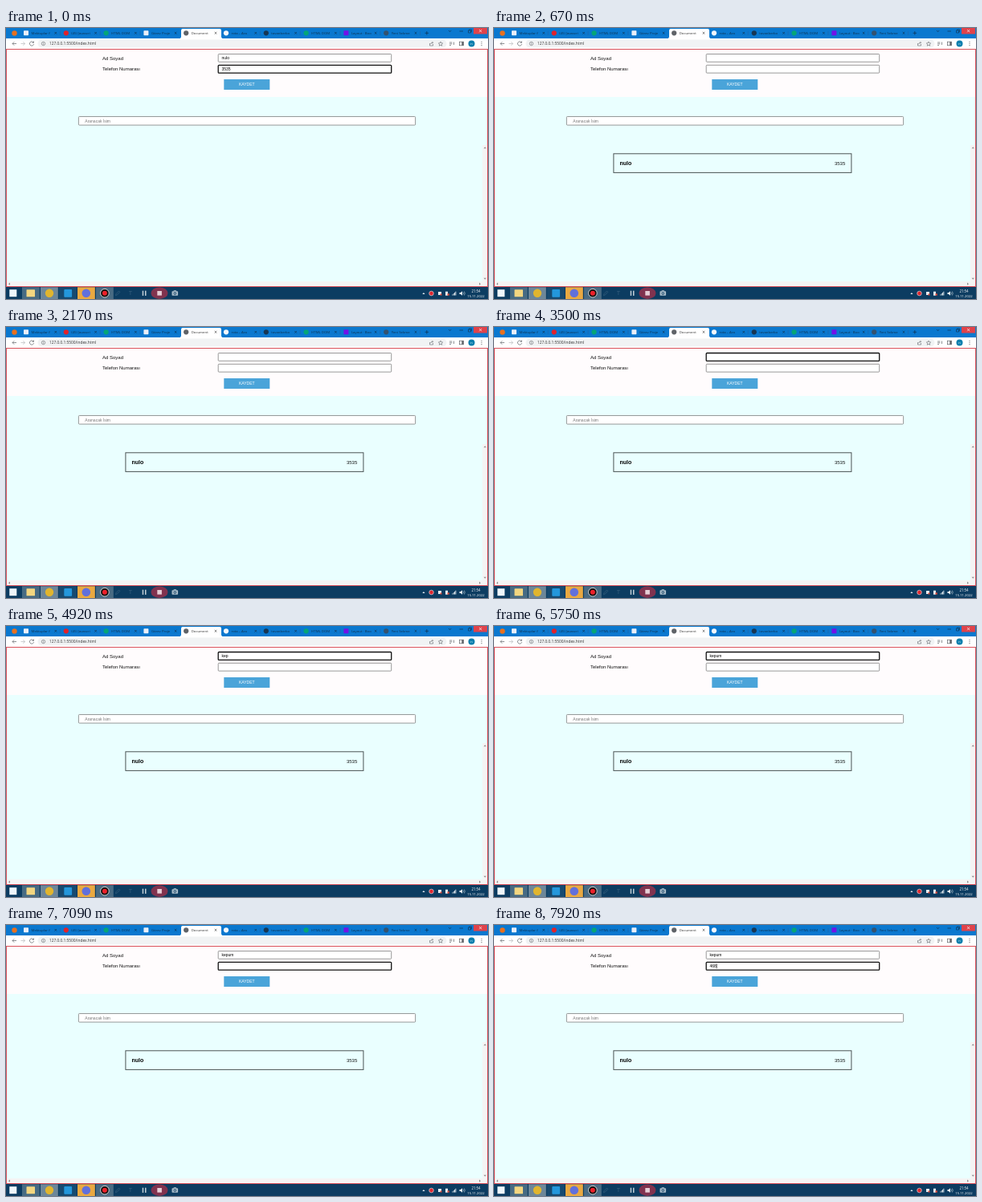
These frames come from a looping animation (600 by 338 pixels, 8000 ms). An HTML page:

```html
<!DOCTYPE html>
<html lang="tr">
<head>
<meta charset="utf-8">
<title>Rehber</title>
<style>
html, body { margin: 0; width: 100%; height: 100%; overflow: hidden; }
svg { display: block; width: 100vw; height: 100vh; }
text { font-family: "Liberation Sans", Arial, sans-serif; white-space: pre; }
.ui { font-family: "Open Sans", "Noto Sans", sans-serif; }
</style>
</head>
<body>
<svg id="stage" viewBox="0 0 600 338" preserveAspectRatio="none"></svg>
<script>
const NS = "http://www.w3.org/2000/svg";
const stage = document.getElementById("stage");
const LOOP = 8000;
const PERSON = "nulo", PHONE = "3535";
const NEXT_PERSON = "kepum", NEXT_PHONE = "468";

function add(tag, attrs, parent = stage) {
  const el = document.createElementNS(NS, tag);
  for (const key in attrs) el.setAttribute(key, attrs[key]);
  parent.appendChild(el);
  return el;
}
const rect = (x, y, width, height, fill, more) => add("rect", { x, y, width, height, fill, ...more });
const disc = (cx, cy, r, fill, more) => add("circle", { cx, cy, r, fill, ...more });
const line = (d, stroke, width = 0.7, more) =>
  add("path", { d, stroke, "stroke-width": width, fill: "none", ...more });
function label(x, y, str, size, fill, more) {
  const el = add("text", { x, y, "font-size": size, fill, ...more });
  el.textContent = str;
  return el;
}
const ui = (x, y, str, size, fill, more) => label(x, y, str, size, fill, { class: "ui", ...more });
const show = (el, on) => el.setAttribute("visibility", on ? "visible" : "hidden");

function drawTabs() {
  const ink = "#10324f";
  rect(0, 0, 600, 14, "#0a78cf");
  add("path", { d: "M215 13.5Q218 13 218 10.5V3Q218 1 220 1H266Q268 1 268 3V10.5Q268 13 271 13.5Z", fill: "#fff" });
  disc(10.5, 6.5, 3.2, "#e8711f");
  const tabs = [
    ["Mektuplar f", "#e9eef8", 0], ["(45) Javascri", "#e0222b", 1], ["HTML DOM", "#06a578", 1],
    ["Görev Proje", "#e9eef8", 0], ["Document", "#5f6368", 1], ["rota – Ara", "#f3f6fb", 1],
    ["tovanberko", "#173653", 1], ["HTML DOM", "#06a578", 1], ["Layout · Boo", "#7212e8", 0],
    ["Yeni Sekme", "#34526f", 1]
  ];
  tabs.forEach(([name, color, round], i) => {
    const x = 25 + i * 49.8;
    if (round) disc(x, 6.3, 3.1, color);
    else rect(x - 3, 3.3, 6, 6, color, { rx: 0.7 });
    ui(x + 6.5, 8, name, 4.3, i === 4 ? "#333" : ink);
    const c = x + 36.8;
    line(`M${c - 1.3} 5l2.6 2.6m0 -2.6l-2.6 2.6`, i === 4 ? "#444" : ink);
    if (i !== 3 && i !== 4) line(`M${c + 5.5} 4v5`, "#2760a0", 0.5);
  });
  line("M521.5 6.3h4.6M523.8 4v4.6", ink);
  line("M551 3l1.6 1.7l1.6 -1.7", ink);
  line("M564.5 4h4.5", ink);
  line("M575.5 3h3v3h-3zM576.5 3v-1h3v3h-1", ink, 0.6);
  rect(582, 0, 17, 7.5, "#e0434b");
  line("M589 2l3.2 3.2m0 -3.2l-3.2 3.2", "#fff");
}

function drawToolbar() {
  const ink = "#5f6368";
  rect(0, 13, 600, 13.5, "#fff");
  line("M13 19.5h-5m2.2 -2.2l-2.2 2.2l2.2 2.2", ink);
  line("M18.5 19.5h5m-2.2 -2.2l2.2 2.2l-2.2 2.2", "#b8babd");
  line("M34 17.8a2.6 2.6 0 1 0 0.6 2.3M34.5 16.5v1.9h-1.9", ink);
  rect(39.5, 14.5, 509, 10, "#f1f3f4", { rx: 5 });
  disc(46.5, 19.5, 2.2, "none", { stroke: ink, "stroke-width": 0.6 });
  line("M46.5 19.2v1.5M46.5 18v0.6", ink, 0.6);
  ui(54, 21.3, "127.0.0.1:5500/index.html", 4.8, "#333");
  line("M527.5 19v3h4v-2M528.5 20.2q0 -2 3 -2m-1.2 -1.3l1.3 1.3l-1.3 1.3", ink, 0.6);
  line("M541 17l.8 1.8l1.9 .2l-1.4 1.3l.4 1.9l-1.7 -1l-1.7 1l.4 -1.9l-1.4 -1.3l1.9 -.2z", ink, 0.6);
  line("M552 18h3.5M552 19.8h3.5M552 21.6h2M557.5 17.5v3.5", ink);
  rect(564.5, 17.2, 5, 4.6, "none", { stroke: ink, "stroke-width": 0.7 });
  rect(567.3, 17.2, 2.2, 4.6, ink);
  disc(579.5, 19.5, 4, "#0b7fae");
  ui(579.5, 21, "n", 4, "#fff", { "text-anchor": "middle" });
  [17.3, 19.5, 21.7].forEach(y => disc(592, y, 0.6, ink));
}

function drawPage() {
  rect(0, 26, 600, 60, "#fffcfd");
  rect(0, 86, 600, 237, "#eaffff");
  label(120, 39.5, "Ad Soyad", 6, "#111");
  label(120, 53.3, "Telefon Numarası", 6, "#111");
  rect(271.3, 64, 57, 13, "#4aa4d9");
  label(299.8, 72.3, "KAYDET", 5, "#fff", { "text-anchor": "middle" });
  rect(90.4, 110.5, 419.2, 10.6, "#fff", { rx: 0.9, stroke: "#777", "stroke-width": 0.75 });
  label(98.3, 117.6, "Aranacak İsim", 5, "#757575");

  rect(593, 146, 6, 170, "#f4f4f4");
  rect(1, 316, 598, 6, "#f4f4f4");
  const arrow = d => add("path", { d, fill: "#8c8c8c" });
  arrow("M594.6 150.2h3.2l-1.6 -2z");
  arrow("M594.6 311.8h3.2l-1.6 2z");
  arrow("M5 317.6v3.2l-2 -1.6z");
  arrow("M589 317.6v3.2l2 -1.6z");
}

function makeCard() {
  const card = add("g", {});
  card.append(
    rect(148.9, 156.8, 296, 23.6, "none", { stroke: "#4b5354", "stroke-width": 1 }),
    label(156.5, 171, PERSON, 7, "#000", { "font-weight": "bold" }),
    label(437.3, 170.6, PHONE, 6, "#111", { "text-anchor": "end" })
  );
  return card;
}

function makeField(y) {
  const box = rect(264.2, y, 215.5, 9.8, "#fff", { rx: 0.9 });
  const value = label(268.5, y + 6.7, "", 5, "#000");
  const caret = rect(268.5, y + 1.9, 0.6, 6, "#000");
  return (str, focused, caretOn) => {
    box.setAttribute("stroke", focused ? "#111" : "#777");
    box.setAttribute("stroke-width", focused ? 1.3 : 0.75);
    if (value.textContent !== str) value.textContent = str;
    caret.setAttribute("x", 268.5 + (str ? value.getComputedTextLength() : 0));
    show(caret, focused && caretOn);
  };
}

function drawTaskbar() {
  rect(0, 323, 600, 15, "#0c3c61");
  rect(4.3, 326.2, 9, 9, "#eef6fb");
  ["#476b83", "#6d8799", "#174a70", "#eaa941", "#496b83"]
    .forEach((fill, i) => rect(20 + i * 23, 323.3, 21.8, 14.7, fill));
  rect(25.5, 326.3, 10.5, 9, "#f3d680", { rx: 0.6 });
  disc(54, 330.7, 5.2, "#e1b52e");
  rect(72.3, 326, 9.8, 9.8, "#2497dc", { rx: 1 });
  disc(99.8, 330.7, 5.3, "#6170dc");
  disc(122.9, 330.7, 5.3, "#111", { stroke: "#f4f4f4", "stroke-width": 0.8 });
  disc(122.9, 330.7, 3, "#ec2029");

  line("M136.5 333.5l.5 -1.8l3.5 -3.7l1.3 1.3l-3.5 3.7z", "#37607e");
  label(155, 333.3, "T", 7, "#37607e", { "text-anchor": "middle" });
  rect(169.7, 327.7, 1.5, 6.2, "#c3d0d8");
  rect(173, 327.7, 1.5, 6.2, "#c3d0d8");
  add("ellipse", { cx: 191, cy: 330.7, rx: 10.5, ry: 7.3, fill: "#81334f" });
  rect(188.3, 328, 5.6, 5.6, "#e6ced6");
  rect(206.5, 328.3, 7.6, 5.4, "#a6bac8", { rx: 0.8 });
  rect(208.7, 327.2, 3.2, 1.5, "#a6bac8");
  disc(210.3, 331, 1.7, "#0c3c61");
  disc(210.3, 331, 0.9, "#a6bac8");

  const white = "#e9eff3";
  add("path", { d: "M518.3 332h3.2l-1.6 -2z", fill: white });
  disc(529.5, 331, 2.8, "#df2830", { stroke: white, "stroke-width": 0.6 });
  rect(538, 329, 4, 4, white);
  rect(540.5, 331.5, 2, 2, "#e04b3c");
  rect(547, 328.7, 3, 5, white);
  rect(549.5, 331.3, 2.3, 2.3, "#e04b3c");
  for (let i = 0; i < 4; i++) {
    const h = 1.2 * (i + 1);
    rect(555.5 + i * 1.3, 333.5 - h, 0.9, h, white);
  }
  add("path", { d: "M564.5 330h1.5l2 -1.7v5.4l-2 -1.7h-1.5z", fill: white });
  line("M569 329.5q1.2 1.5 0 3M570.3 328.5q2 2.5 0 5", white, 0.5);
  ui(585, 329.5, "21:54", 4.4, "#fff", { "text-anchor": "middle" });
  ui(585, 336, "15.11.2022", 4.2, "#fff", { "text-anchor": "middle" });
}

drawTabs();
drawToolbar();
drawPage();
const card = makeCard();
const nameField = makeField(32.5);
const phoneField = makeField(46.3);
rect(0.5, 26.5, 599, 296, "none", { stroke: "#d9505a", "stroke-width": 1 });
drawTaskbar();

const between = (t, from, to) => t >= from && t < to;
const typed = (str, t, times) => str.slice(0, times.filter(at => t >= at).length);
const caretSpans = [[250, 500], [2590, 3090], [3590, 4340], [5000, 5750], [6090, 6670], [7170, LOOP]];

function render(t) {
  const saved = t >= 590;
  const caretOn = caretSpans.some(([from, to]) => between(t, from, to));
  const person = saved ? typed(NEXT_PERSON, t, [3750, 3920, 4000, 5000, 5170]) : PERSON;
  const phone = saved ? typed(NEXT_PHONE, t, [7340, 7500, 7590]) : PHONE;
  nameField(person, between(t, 2500, 6090), caretOn);
  phoneField(phone, t < 500 || t >= 6090, caretOn);
  show(card, saved);
}

const start = performance.now();
function tick() {
  render((performance.now() - start) % LOOP);
  requestAnimationFrame(tick);
}
render(0);
requestAnimationFrame(tick);
</script>
</body>
</html>
```
